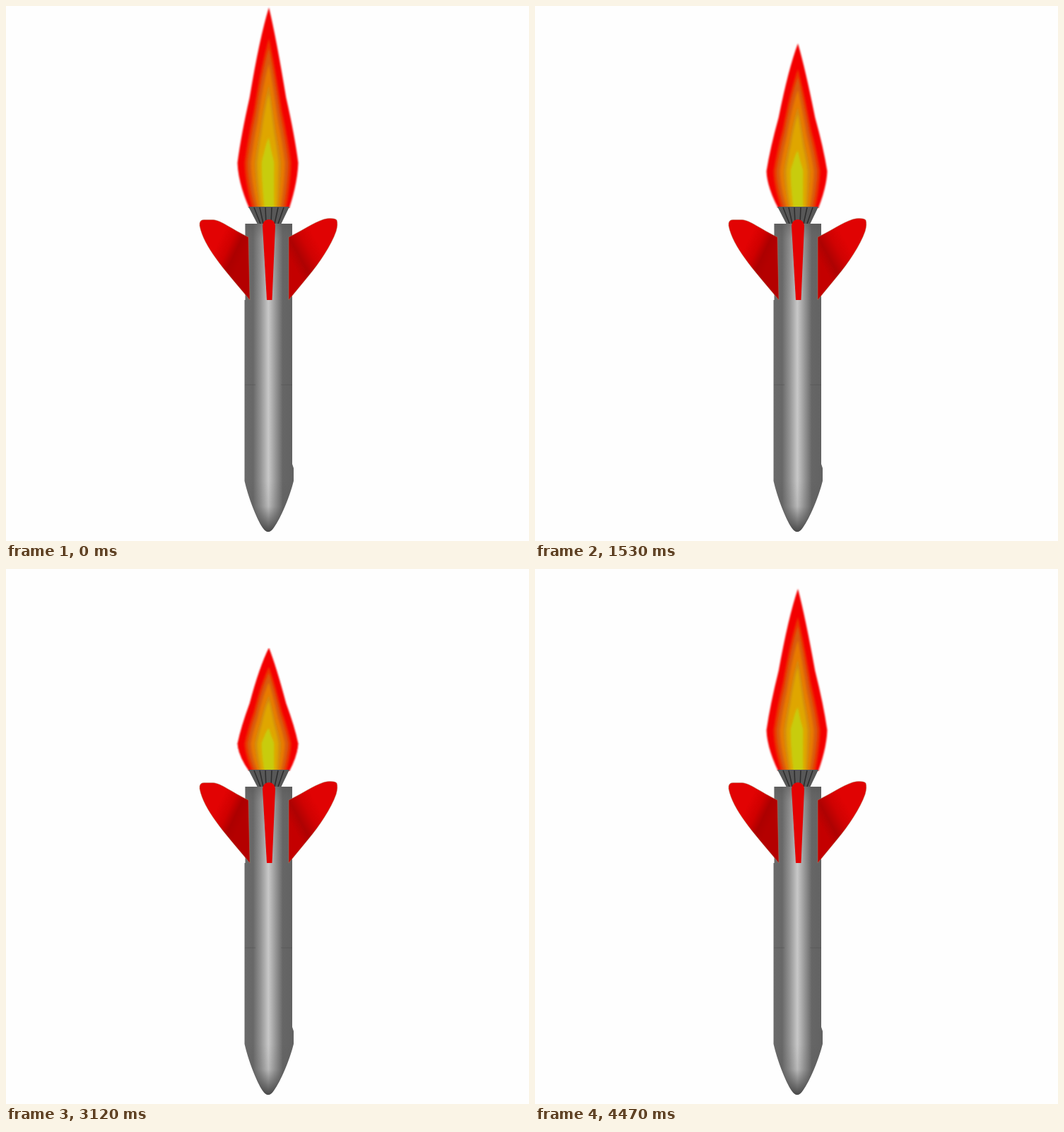
These frames come from a looping animation (740 px wide and 757 px high, 4500 ms). An HTML page:

```html
<!DOCTYPE html>
<html lang="en">
<head>
<meta charset="utf-8">
<title>Rocket</title>
<style>
  html, body { margin: 0; width: 100%; height: 100%; overflow: hidden; background: #fefefe; }
  svg { display: block; width: 740px; height: 757px; }
</style>
</head>
<body>
<svg viewBox="0 0 740 757">
  <defs>
    <linearGradient id="metal" gradientUnits="userSpaceOnUse" x1="337" x2="407" y1="0" y2="0">
      <stop offset="0" stop-color="#6a6a6a"/>
      <stop offset=".18" stop-color="#686868"/>
      <stop offset=".33" stop-color="#929292"/>
      <stop offset=".49" stop-color="#c8c8c8"/>
      <stop offset=".64" stop-color="#959595"/>
      <stop offset=".78" stop-color="#666"/>
      <stop offset="1" stop-color="#626262"/>
    </linearGradient>
    <linearGradient id="tailShade" x1="0" x2="0" y1="0" y2="1">
      <stop offset="0" stop-color="#555" stop-opacity=".5"/>
      <stop offset=".2" stop-color="#666" stop-opacity=".15"/>
      <stop offset="1" stop-color="#666" stop-opacity="0"/>
    </linearGradient>
    <linearGradient id="noseShade" x1="0" x2="0" y1="0" y2="1">
      <stop offset="0" stop-color="#484848" stop-opacity="0"/>
      <stop offset=".5" stop-color="#484848" stop-opacity=".12"/>
      <stop offset="1" stop-color="#424242" stop-opacity=".95"/>
    </linearGradient>
    <linearGradient id="finL" gradientUnits="userSpaceOnUse" x1="300" y1="335" x2="336" y2="352">
      <stop offset="0" stop-color="#e20303"/>
      <stop offset=".4" stop-color="#d00000"/>
      <stop offset=".7" stop-color="#ac0000"/>
      <stop offset="1" stop-color="#b40000"/>
    </linearGradient>
    <linearGradient id="finR" gradientUnits="userSpaceOnUse" x1="404" y1="362" x2="444" y2="340">
      <stop offset="0" stop-color="#c40000"/>
      <stop offset=".3" stop-color="#ae0202"/>
      <stop offset=".65" stop-color="#d00202"/>
      <stop offset="1" stop-color="#e00303"/>
    </linearGradient>
    <filter id="edge" x="-20%" y="-5%" width="140%" height="110%"><feGaussianBlur stdDeviation="1.2"/></filter>
    <filter id="soft" x="-50%" y="-10%" width="200%" height="120%"><feGaussianBlur stdDeviation="1.8"/></filter>
    <clipPath id="above"><path d="M300 -10H440V286H300Z"/></clipPath>
  </defs>

  <g clip-path="url(#above)"><g id="flame"></g></g>

  <path d="M343 284H401L389 309H356Z" fill="#585858"/>
  <path d="M351 285L360 308M359 285L364 308M367 285L368 308M376 285L375 308M385 285L380 308M393 285L385 308" stroke="#2c2c2c" stroke-width="1.5"/>

  <path d="M338.500 308H405V648L407 654V672C401 696 389 724 379 738Q371 750 363 738C354 724 343 696 337.500 672V416H338.500Z" fill="url(#metal)"/>
  <path d="M338.500 308H405V416H338.500Z" fill="url(#tailShade)"/>
  <path d="M337.500 672H407C401 696 389 724 379 738Q371 750 363 738C354 724 343 696 337.500 672Z" fill="url(#noseShade)"/>
  <path d="M338 536H353M389 536H405" stroke="#4a4a4a" stroke-opacity=".4"/>

  <g stroke="#b08060" stroke-opacity=".5">
    <path d="M274 311Q273 302.500 280 302.500H293C304 303 318 315 343 327L345 416C326 393 309 374 297 357C286 342 277 326 274 311Z" fill="url(#finL)"/>
    <path d="M400 327C419 318 434 307 449 302C457 300 465 300 468 303Q470 309 467 319C460 339 443 364 428 382L400 416Z" fill="url(#finR)"/>
  </g>
  <path d="M363 311C364 299 380 299 381 311L376.500 416H369Z" fill="#e30202"/>
</svg>
<script>
const LOOP = 4500, STEP = 30, BASE = 287, FULL_TIP = 2;

// half width, tip height, half width at the nozzle, colour, blur
const layers = [
  [43, 2, 28, '#f30505', 'edge'],
  [33, 46, 24, '#ea3604', 'soft'],
  [29, 60, 20, '#d85c0c', 'soft'],
  [24, 82, 16, '#e87a06', 'soft'],
  [19, 110, 13, '#d48a08', 'soft'],
  [15, 124, 11, '#dfa606', 'soft'],
  [9, 186, 7, '#c8cc0c', 'soft']
];

// time, height of the flame tip
const tips = [
  [0, 2], [750, 155], [900, 137], [1530, 53], [1620, 42], [1740, 26],
  [2040, 81], [2140, 100], [2670, 26], [3115, 112], [3600, 34],
  [3750, 62], [3996, 109], [4470, 28]
];

const flame = document.getElementById('flame');

function flamePath(w, tip, foot) {
  const cx = 370.5, footX = 372.5, belly = 222, h = belly - tip;
  const side = s => {
    const x = k => cx + s * k * w;
    return {
      neck: `${x(.28)} ${tip + h * .2}`,
      shoulder: `${x(.6)} ${tip + h * .58}`,
      bend: `${x(.88)} ${tip + h * .82}`,
      belly: `${x(1)} ${belly}`,
      low: `${x(.98)} ${belly + 28}`,
      foot: `${footX + s * foot} ${BASE}`
    };
  };
  const l = side(-1), r = side(1);
  return `M372 ${tip}Q${l.neck} ${l.shoulder}Q${l.bend} ${l.belly}Q${l.low} ${l.foot}` +
    `V310H${footX + foot}V${BASE}Q${r.low} ${r.belly}Q${r.bend} ${r.shoulder}Q${r.neck} 372 ${tip}Z`;
}

for (const [w, tip, foot, fill, blur] of layers) {
  const p = document.createElementNS('http://www.w3.org/2000/svg', 'path');
  p.setAttribute('d', flamePath(w, tip, foot));
  p.setAttribute('fill', fill);
  p.setAttribute('filter', `url(#${blur})`);
  flame.append(p);
}

function tipAt(t) {
  const i = tips.findIndex(([time]) => time >= t);
  if (i <= 0) return tips[0][1];
  const [t0, y0] = tips[i - 1], [t1, y1] = tips[i];
  return y0 + (y1 - y0) * (t - t0) / (t1 - t0);
}

const start = performance.now();

function draw(now) {
  const t = Math.floor(Math.max(0, now - start) % LOOP / STEP) * STEP;
  const scale = (BASE - tipAt(t)) / (BASE - FULL_TIP);
  flame.setAttribute('transform', `matrix(1 0 0 ${scale} 0 ${BASE * (1 - scale)})`);
  requestAnimationFrame(draw);
}
draw(start);
</script>
</body>
</html>
```
